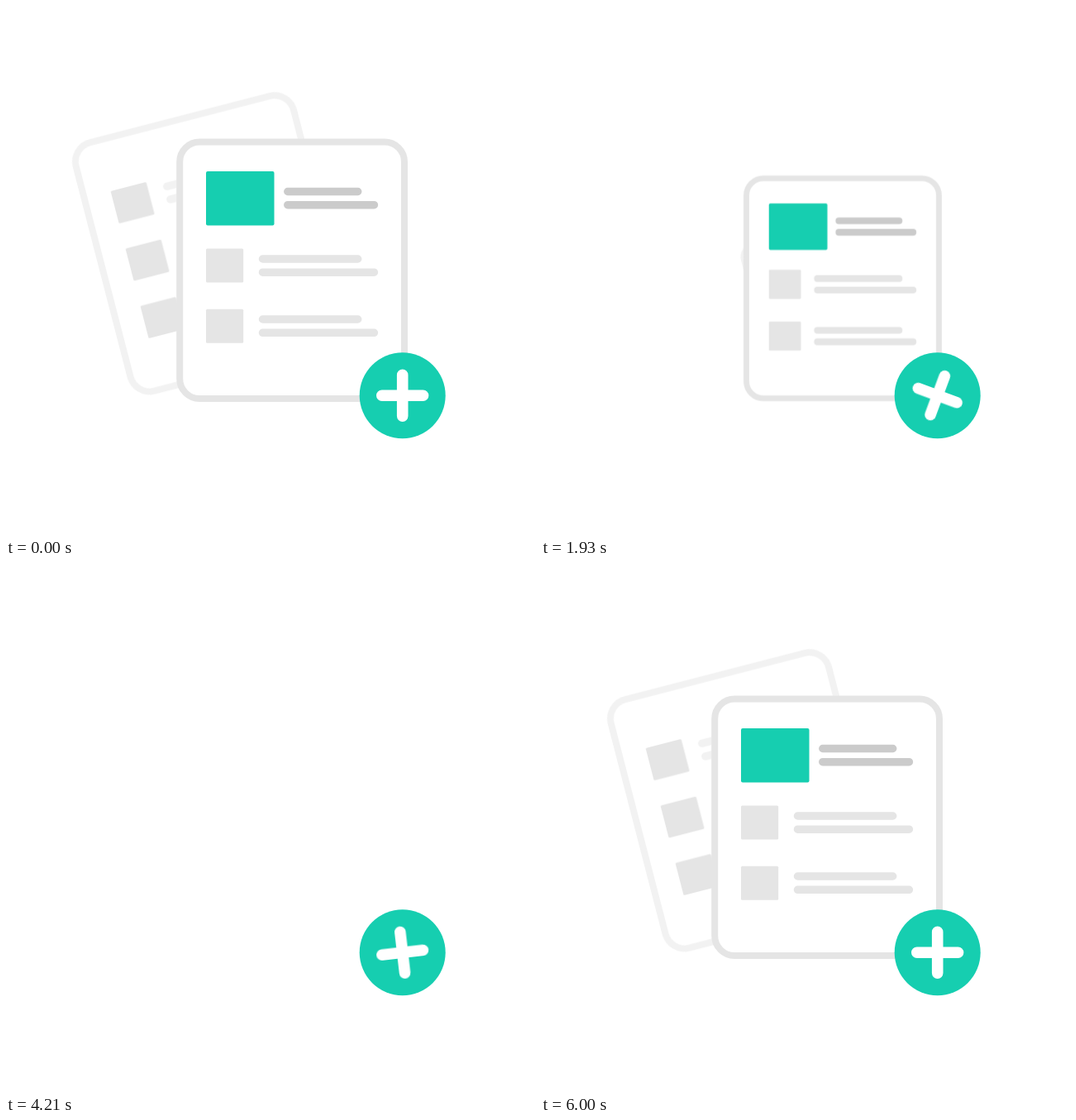
Write an HTML page that moves like this. It is 640 px wide and 640 px high and loops after 7210 ms.

```html
<!DOCTYPE html>
<html lang="en">
<head>
<meta charset="utf-8">
<title>Add document</title>
<style>
  html, body { margin: 0; width: 100%; height: 100%; overflow: hidden; background: #fff; }
  svg { display: block; width: 100%; height: 100%; }

  .sheet { fill: #fff; stroke-width: 8; }
  .box { fill: #e5e5e5; }
  .accent { fill: #16ceb0; }
  .line { fill: none; stroke-width: 9.5; stroke-linecap: round; }
  .grey { stroke: #e5e5e5; }
  .pale { stroke: #f2f2f2; }
  .dark { stroke: #cbcbcb; }
  .cross { fill: none; stroke: #fff; stroke-width: 13.6; stroke-linecap: round; }

  /* Every animation is paused; the script sets its time. */
  .back, .front, .cross { transform-box: view-box; animation-play-state: paused !important; }
  .back, .front { transform-origin: 478px 472px; }
  .cross { transform-origin: 479.7px 471.2px; }

  .back {
    animation:
      shrink 1.8s 1.2s cubic-bezier(.515, 0, .333, 1) forwards,
      grow 1.8s 4.2s cubic-bezier(.896, 0, .45, 1) forwards;
  }
  .front {
    animation:
      shrink 1.8s 1.2s cubic-bezier(.84, 0, .333, 1) forwards,
      grow 1.8s 4.2s cubic-bezier(.84, 0, .333, 1) forwards;
  }
  .cross {
    animation:
      wind 1.5s 1.5s cubic-bezier(.333, .321, .667, .654) forwards,
      unwind 1.5s 4.2s cubic-bezier(.333, .321, .667, .654) forwards;
  }

  @keyframes shrink { from { transform: scale(1); } to { transform: scale(0); } }
  @keyframes grow { from { transform: scale(0); } to { transform: scale(1); } }
  @keyframes wind { from { transform: rotate(0deg); } to { transform: rotate(720deg); } }
  @keyframes unwind { from { transform: rotate(720deg); } to { transform: rotate(0deg); } }
</style>
</head>
<body>
<svg viewBox="0 0 640 640">
  <defs>
    <g id="row">
      <rect class="box" width="44.5" height="40.5" rx="1.5"/>
      <path class="line pale" d="M67.5 11.5H182.5M67.5 27.7H202.5"/>
    </g>
  </defs>

  <g class="back">
    <g transform="translate(249.3 287.3) rotate(-14.5)">
      <rect class="sheet pale" x="-136" y="-155.25" width="272" height="310.5" rx="24"/>
      <use href="#row" x="-103" y="-92"/>
      <use href="#row" x="-103" y="-20.2"/>
      <use href="#row" x="-103" y="51.6"/>
    </g>
  </g>

  <g class="front">
    <rect class="sheet grey" x="210.2" y="164.5" width="271.8" height="310.5" rx="24"/>
    <rect class="accent" x="242" y="200" width="82.5" height="65.5" rx="2"/>
    <path class="line dark" d="M340.8 224.5H425.7M340.8 240.7H445.4"/>
    <rect class="box" x="242" y="293.6" width="45.2" height="41" rx="1.5"/>
    <path class="line grey" d="M310.5 306H425.7M310.5 322.2H445.4"/>
    <rect class="box" x="242" y="366.7" width="45.2" height="41" rx="1.5"/>
    <path class="line grey" d="M310.5 379H425.7M310.5 395.3H445.4"/>
  </g>

  <circle class="accent" cx="479.7" cy="471.2" r="52"/>
  <path class="cross" d="M454.8 471.2H504.6M479.7 446.3V496.1"/>
</svg>
<script>
  const LOOP = 7210;
  const FPS = 14;
  const animations = document.getAnimations();
  let start;

  function tick(now) {
    start ??= now;
    const elapsed = (now - start) % LOOP;
    // Poses advance in steps of 1/14 s, with changes rounded to 10 ms.
    const step = Math.floor((elapsed + 5) * FPS / 1000);
    for (const animation of animations) animation.currentTime = step * 1000 / FPS;
    requestAnimationFrame(tick);
  }
  requestAnimationFrame(tick);
</script>
</body>
</html>
```
